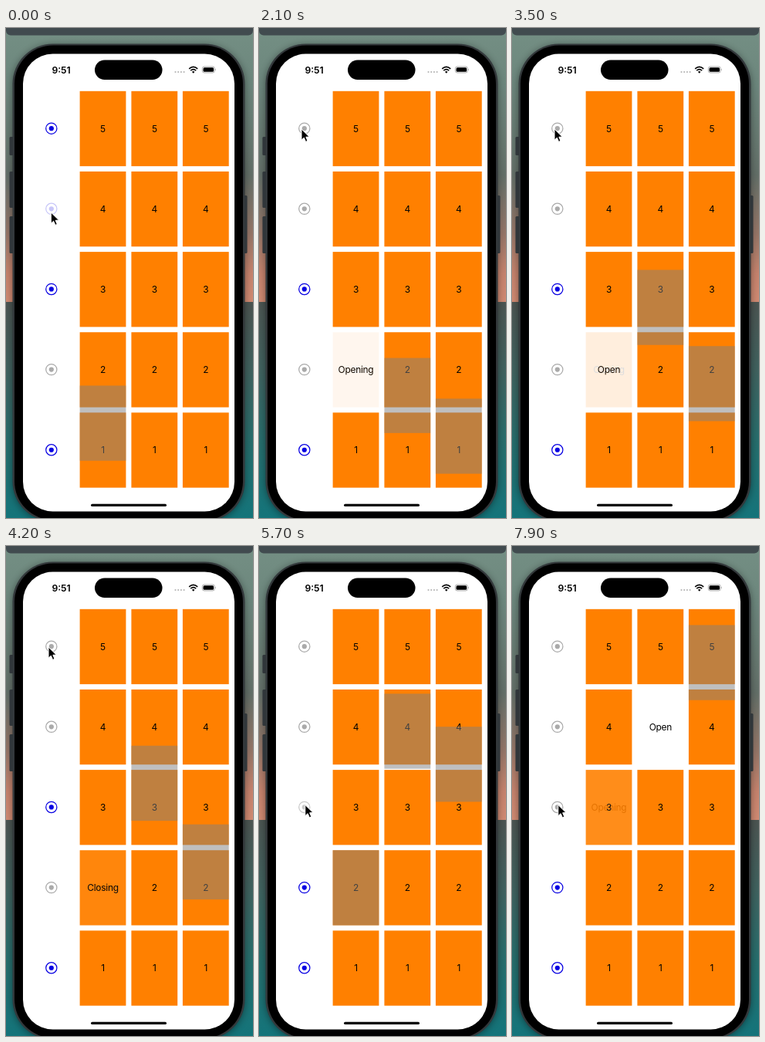
Animation of 320x635 px, one loop 8 s. Source, as an HTML page:

```html
<!DOCTYPE html>
<html lang="en">
<head>
<meta charset="utf-8">
<title>Elevators</title>
<style>
  html, body { margin: 0; width: 100%; height: 100%; overflow: hidden; background: #000; }
  svg { display: block; width: 320px; height: 635px; }
  text { font-family: Inter, Roboto, sans-serif; text-anchor: middle; }
  .label { font-size: 11.9px; letter-spacing: -0.25px; }
  .clock { font-size: 12.2px; font-weight: 600; }
</style>
</head>
<body>
<svg id="stage" viewBox="0 0 320 635">
  <defs>
    <linearGradient id="wall" x1="0" y1="0" x2="0" y2="1">
      <stop offset="0" stop-color="#748f84"/>
      <stop offset=".12" stop-color="#6c867c"/>
      <stop offset=".3" stop-color="#636f68"/>
      <stop offset=".42" stop-color="#957567"/>
      <stop offset=".5" stop-color="#c5836d"/>
      <stop offset=".559" stop-color="#d08a72"/>
      <stop offset=".559" stop-color="#4c5552"/>
      <stop offset=".7" stop-color="#40625f"/>
      <stop offset=".85" stop-color="#266e6d"/>
      <stop offset="1" stop-color="#14747a"/>
    </linearGradient>
    <filter id="blur" x="-20%" width="140%" y="-10%" height="120%">
      <feGaussianBlur stdDeviation="5"/>
    </filter>
  </defs>
  <rect width="320" height="635" fill="url(#wall)"/>
  <rect x="8.5" y="22" width="301" height="619" rx="52" opacity=".4" filter="url(#blur)"/>
  <rect y="-10" width="320" height="19.5" rx="6" fill="#414b4f"/>

  <g fill="#30363a">
    <rect x="4.5" y="141" width="6" height="24" rx="1.5"/>
    <rect x="4.5" y="186" width="6" height="47" rx="1.5"/>
    <rect x="4.5" y="244" width="6" height="48" rx="1.5"/>
    <rect x="307" y="217" width="5.5" height="75" rx="1.5"/>
  </g>
  <rect x="8.5" y="20.5" width="301" height="619" rx="52" fill="#33383b"/>
  <rect x="11" y="22.5" width="296" height="615" rx="50" fill="#000"/>
  <rect x="22" y="33.5" width="274" height="593" rx="38.5" fill="#fff"/>

  <rect x="115" y="41.5" width="87.5" height="25.5" rx="12.75"/>
  <text class="clock" x="71.6" y="58.5">9:51</text>
  <g id="dots" fill="#b5b5b5"></g>
  <g fill="none" stroke="#000" stroke-width="1.7">
    <path d="M237.2 52.8Q242.7 48 248.2 52.8"/>
    <path d="M239.2 55.1Q242.7 52.1 246.2 55.1"/>
  </g>
  <path d="M240.9 56.8Q242.7 55.3 244.5 56.8L242.7 58.7Z"/>
  <rect x="254.3" y="50" width="16" height="8" rx="2.5" fill="none" stroke="#9a9a9a" stroke-width=".8"/>
  <rect x="255.5" y="51.2" width="13.6" height="5.6" rx="1.5"/>
  <path d="M271.3 52.8Q273 54 271.3 55.2Z" fill="#9a9a9a"/>

  <g id="cells"></g>
  <g id="lifts"></g>
  <g id="buttons"></g>
  <rect x="110" y="616.7" width="98" height="3.4" rx="1.7"/>
  <path id="cursor" d="M0 0V14.2L3.3 11.2L5.6 16.4L8 15.3L5.8 10.3L10.2 10Z"
        stroke="#fff" stroke-width="1" stroke-linejoin="round"/>
</svg>
<script>
const LOOP = 8000, STEP = 100;
const FLOOR_MS = 2083, DOOR_MS = 1042;
const PITCH = 104.15, CELL_W = 59.8, CELL_H = 97.3;
const COL_X = [95.6, 162.4, 228.9];
const BLUE = '#0800e2', GRAY = '#aaaaaa';

const trips = [
  { col: 0, from: 1, to: 2, start: -838 },
  { col: 1, from: 1, to: 4, start: 40 },
  { col: 2, from: 1, to: 5, start: 875 },
  { col: 0, from: 2, to: 3, start: 5673 }
];
// floor, press time, release time
const taps = [[4, -80, 50], [5, 780, 875], [3, 5560, 5673]];
// time, x, y of the pointer tip
const path = [
  [150, 58.3, 239], [450, 46, 180], [750, 55, 131],
  [4600, 55, 131], [5350, 59.8, 335.5]
];

const $ = id => document.getElementById(id);
const clamp = v => Math.min(1, Math.max(0, v));
const mix = (a, b, p) => a + (b - a) * p;
const floorY = n => 81.8 + (5 - n) * PITCH;

function el(parent, tag, attrs, text = '') {
  const node = document.createElementNS('http://www.w3.org/2000/svg', tag);
  set(node, attrs);
  node.textContent = text;
  return parent.appendChild(node);
}

function set(node, attrs) {
  for (const key in attrs) node.setAttribute(key, attrs[key]);
}

function bezier(x1, y1, x2, y2) {
  const at = (a, b, s) => 3 * a * s * (1 - s) ** 2 + 3 * b * s * s * (1 - s) + s ** 3;
  return x => {
    let lo = 0, hi = 1;
    for (let i = 0; i < 24; i++) {
      const mid = (lo + hi) / 2;
      if (at(x1, x2, mid) < x) lo = mid; else hi = mid;
    }
    return at(y1, y2, lo);
  };
}
const rideEase = bezier(.42, 0, .58, 1);
const doorEase = bezier(.5, .32, .64, 1);

for (let i = 0; i < 4; i++) el($('dots'), 'circle', { cx: 219.5 + i * 3.7, cy: 57, r: 1.1 });

// Each cell has a label on the back wall and a door, with its own label, that fades over it.
const cells = COL_X.map(x => {
  const column = {};
  for (let n = 1; n <= 5; n++) {
    const y = floorY(n);
    const label = parent => el(parent, 'text',
      { class: 'label', x: x + CELL_W / 2, y: y + CELL_H / 2 + 4.2 });
    const back = label($('cells'));
    const door = el($('cells'), 'g', {});
    el(door, 'rect', { x, y, width: CELL_W, height: CELL_H, fill: '#ff8000' });
    column[n] = { back, door, front: label(door) };
  }
  return column;
});

const lifts = COL_X.map(x => el($('lifts'), 'rect',
  { x, width: CELL_W, height: CELL_H, fill: '#808080', 'fill-opacity': .5 }));

const buttons = {};
for (let n = 1; n <= 5; n++) {
  const g = buttons[n] = el($('buttons'), 'g', {});
  const cx = 58.8, cy = floorY(n) + CELL_H / 2 - .3;
  el(g, 'circle', { cx, cy, r: 7.1, fill: 'none', stroke: 'currentColor', 'stroke-width': 1.25 });
  el(g, 'circle', { cx, cy, r: 3.1, fill: 'currentColor' });
}

function paintCell({ back, door, front }, frontText, shade = 1, backText = '') {
  front.textContent = frontText;
  back.textContent = backText;
  set(door, { opacity: shade });
}

function paintTrip({ col, from, to, start }, t) {
  const ride = (to - from) * FLOOR_MS;
  const u = (t - start) / ride;
  if (u < 0) return;
  if (u < 1) {
    set(lifts[col], { y: mix(floorY(from), floorY(to), rideEase(u)), opacity: 1 });
    return;
  }
  const phase = (t - start - ride) / DOOR_MS;
  const p = doorEase(phase % 1);
  const cell = cells[col][to];
  if (phase < 1) paintCell(cell, to, 1 - p, 'Opening');
  else if (phase < 2) paintCell(cell, '', 0, 'Open');
  else if (phase < 3) paintCell(cell, 'Closing', p, 'Open');
}

function paintButtons(t) {
  const doorsShut = trips[0].start + FLOOR_MS + 3 * DOOR_MS;
  for (let n = 1; n <= 5; n++) {
    let color = n === 2 && t < doorsShut ? GRAY : BLUE, opacity = 1;
    const tap = taps.find(([floor]) => floor === n);
    if (tap && t >= tap[2]) {
      color = GRAY;
      opacity = mix(.6, 1, clamp((t - tap[2]) / 350));
    } else if (tap && t >= tap[1]) opacity = .22;
    set(buttons[n], { color, opacity });
  }
}

function paintCursor(t) {
  let i = 0;
  while (i < path.length - 2 && t > path[i + 1][0]) i++;
  const [t0, x0, y0] = path[i], [t1, x1, y1] = path[i + 1];
  const p = rideEase(clamp((t - t0) / (t1 - t0)));
  set($('cursor'), { transform: `translate(${mix(x0, x1, p)} ${mix(y0, y1, p)})` });
}

function render(t) {
  for (const column of cells)
    for (const n in column) paintCell(column[n], n);
  for (const lift of lifts) set(lift, { opacity: 0 });
  for (const trip of trips) paintTrip(trip, t);
  paintButtons(t);
  paintCursor(t);
}

const origin = performance.now();
function tick() {
  const t = (performance.now() - origin) % LOOP;
  render(Math.floor(t / STEP) * STEP);
  requestAnimationFrame(tick);
}
tick();
</script>
</body>
</html>
```
